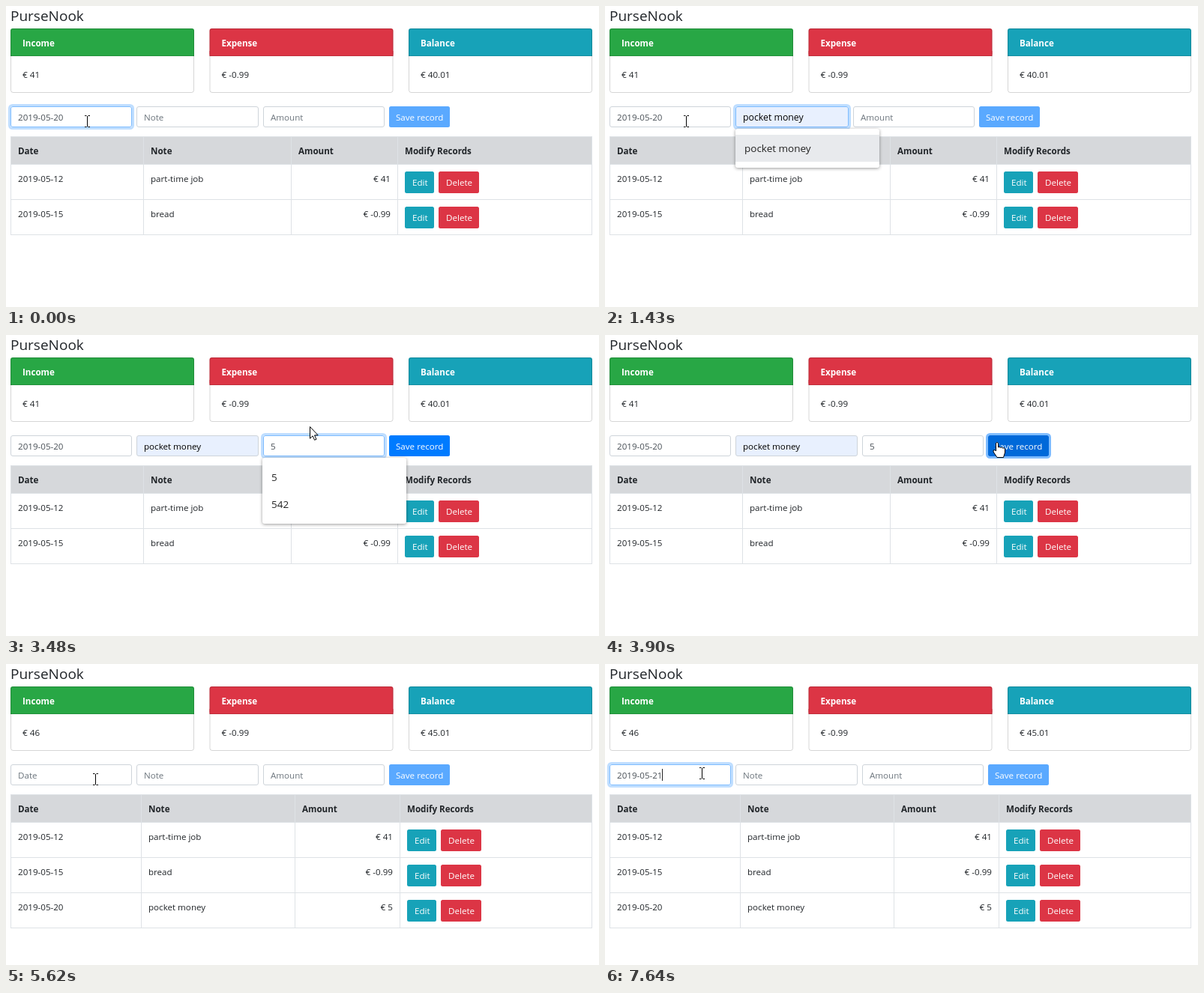
Recreate the animation shown at these times as an HTML page. Size 791 by 402 pixels, loop 8 s.

```html
<!DOCTYPE html>
<html lang="en">
<head>
<meta charset="utf-8">
<title>Budget table</title>
<style>
  html, body { margin: 0; width: 100%; height: 100%; overflow: hidden; background: #fff; }
  svg { display: block; width: 791px; height: 402px; }
  text { font: 11.6px "Open Sans", "Noto Sans", sans-serif; fill: #212529; white-space: pre; }
  .b { font-weight: 700; }
  .w { fill: #fff; }
  .hint { fill: #6c757d; }
  .typed { fill: #495057; }
  .auto { fill: #000; }
  .preview { font-size: 12.3px; fill: #000; }
  .item { font-size: 13.5px; fill: #222; }
  .title { font-size: 19px; font-weight: 500; }
  .end { text-anchor: end; }
  .pop { filter: drop-shadow(0 1px 2px rgba(0, 0, 0, .4)); }
</style>
</head>
<body>
<svg id="stage" viewBox="0 0 791 402"></svg>
<script>
const LOOP = 8000;
const SAVE = 4670;
const BLUE = '#007bff', TEAL = '#17a2b8', RED = '#dc3545', GREEN = '#28a745';
const stage = document.getElementById('stage');
const pen = document.createElement('canvas').getContext('2d');

const clamp = v => Math.max(0, Math.min(1, v));
const ease = v => { v = clamp(v); return v * v * (3 - 2 * v); };
const fade = (t, on, off, ms = 130) => ease((t - on) / ms) - ease((t - off) / ms);
const within = (t, a, b) => t >= a && t < b;
const valueAt = (t, steps) => steps.filter(s => t >= s[0]).pop()[1];

const text = (x, y, s, cls = '') => `<text x="${x}" y="${y}" class="${cls}">${s}</text>`;
const rect = (x, y, w, h, fill, r = 0, extra = '') =>
  `<rect x="${x}" y="${y}" width="${w}" height="${h}" rx="${r}" fill="${fill}" ${extra}/>`;
const line = (x1, y1, x2, y2, color = '#dee2e6') =>
  `<path d="M${x1} ${y1}L${x2} ${y2}" stroke="${color}"/>`;
const ring = (x, w, alpha) => alpha > 0
  ? rect(x - 1.5, 132.5, w + 3, 31, 'none', 4, `stroke="${BLUE}" stroke-width="3" stroke-opacity="${alpha.toFixed(3)}"`) : '';
const mix = (a, b, k) => `rgb(${a.map((v, i) => Math.round(v + (b[i] - v) * k))})`;

function textWidth(s) {
  pen.font = '11.6px "Open Sans", "Noto Sans", sans-serif';
  return pen.measureText(s).width;
}

// Form contents over time
const DATE = [[0, '2019-05-20'], [SAVE, ''], [6710, '2'], [7140, '2019-05'], [7600, '2019-05-2'], [7640, '2019-05-21']];
const NOTE = [[0, ''], [580, 'p'], [1410, 'pocket money'], [SAVE, '']];
const AMOUNT = [[0, ''], [2970, '5'], [SAVE, '']];

// field, on, off
const CARETS = [[1, 110, 1170], [1, 1680, 2150], [2, 2170, 2660], [2, 2970, 3470], [0, 5890, 6390], [0, 6710, LOOP]];

// x, on, off, items
const POPUPS = [
  [174, 600, 1680, ['pocket money']],
  [342, 2970, 3770, ['5', '542']],
  [6, 5910, 6710, ['21-03-2019', '2019-05-05', '2019-04-13', '2019-04-10', '28-02-2019', '01-03-2019']],
  [6, 7140, 7600, ['2019-05-05']]
];

// time, x, y
const PATH = [
  [0, 108, 154], [3210, 108, 154], [3300, 190, 130], [3400, 310, 120], [3480, 404, 122], [3560, 480, 130],
  [3620, 523, 143], [4440, 523, 143], [4540, 485, 126], [SAVE, 485, 126], [5020, 421, 147], [5200, 421, 147],
  [5400, 270, 157], [5620, 119, 154], [5710, 121, 150], [6300, 121, 150], [6460, 129, 146], [LOOP, 129, 146]
];

function card(x, color, name, amount) {
  return rect(x, 30, 245, 37, color, 3) + rect(x, 60, 245, 7, color) +
    line(x, 66.5, x + 245, 66.5, 'rgba(0,0,0,.125)') +
    rect(x + .5, 30.5, 244, 85, 'none', 3, 'stroke="rgba(0,0,0,.16)"') +
    text(x + 16, 54, name, 'b w') + text(x + 16, 96, '€ ' + amount);
}

function table(saved) {
  const rows = [['2019-05-12', 'part-time job', '41'], ['2019-05-15', 'bread', '-0.99']];
  if (saved) rows.push(['2019-05-20', 'pocket money', '5']);
  const cols = saved ? [6, 180, 385, 525] : [6, 183, 380, 522];
  const bottom = 211.5 + rows.length * 47;
  let out = rect(6, 174, 776, 38, '#d6d8db');
  for (let y = 211.5; y <= bottom; y += 47) out += line(6, y, 782, y);
  out += line(6, 174.5, 782, 174.5);
  for (const x of [...cols, 781]) out += line(x + .5, 174, x + .5, bottom + .5);
  ['Date', 'Note', 'Amount', 'Modify Records'].forEach((s, i) => {
    out += text(cols[i] + 10, 198, s, 'b');
  });
  rows.forEach(([date, note, amount], i) => {
    const y = 235 + i * 47, x = cols[3] + 10;
    out += text(16, y, date) + text(cols[1] + 10, y, note) + text(cols[3] - 9, y, '€ ' + amount, 'end') +
      rect(x, y - 14, 39, 29, TEAL, 2.5) + text(x + 10, y + 5, 'Edit', 'w') +
      rect(x + 45, y - 14, 54, 29, RED, 2.5) + text(x + 55, y + 5, 'Delete', 'w');
  });
  return out;
}

function field(x, w, hint, value, focus, cls) {
  const auto = cls !== 'typed' && value;
  return ring(x, w, focus * .25) +
    rect(x + .5, 134.5, w - 1, 27, auto ? '#e8f0fe' : '#fff', 2.5,
      `stroke="${mix([206, 212, 218], [128, 189, 255], focus)}"`) +
    text(x + 10, 153, value || hint, value ? cls : 'hint');
}

function form(t) {
  const preview = within(t, 1410, 1680);
  const shift = preview ? -12 : 0;
  const noteWidth = preview ? 151 : 163;
  const noteClass = preview ? 'preview' : t >= 1680 ? 'auto' : 'typed';
  const values = [DATE, NOTE, AMOUNT].map(s => valueAt(t, s));
  const ready = within(t, 2970, SAVE);
  const hover = fade(t, 3770, 4460);
  const bx = 511 + shift;
  let out =
    field(6, 162, 'Date', values[0], 1 - ease((t - 100) / 110) + ease((t - 5880) / 130), 'typed') +
    field(174, noteWidth, 'Note', values[1], fade(t, 100, 2150), noteClass) +
    field(343 + shift, 162, 'Amount', values[2], fade(t, 2150, 3770), 'typed') +
    (ready ? ring(bx, 81, fade(t, 3770, LOOP) * .5) : '') +
    rect(bx, 134, 81, 28, ready ? mix([0, 123, 255], [0, 105, 217], hover) : '#5aa9ff', 2.5) +
    text(bx + 9, 153, 'Save record', 'w');
  const caret = CARETS.find(c => within(t, c[1], c[2]));
  if (caret && !preview) {
    const x = Math.floor([16, 184, 353][caret[0]] + textWidth(values[caret[0]])) + .5;
    out += line(x, 140, x, 156, '#222');
  }
  return out;
}

function popup(t, [x, on, off, items]) {
  if (!within(t, on, off)) return '';
  const marked = within(t, 1410, 1680);
  return `<g class="pop" opacity="${clamp((t - on + 25) / 80).toFixed(2)}">` +
    rect(x, 164, 192, 16 + items.length * 36, '#fff', 3) +
    (marked ? rect(x, 172, 192, 36, '#e8eaed') : '') +
    items.map((s, i) => text(x + 12, 195 + i * 36, s, 'item')).join('') + '</g>';
}

const SHAPES = {
  beam: '<path d="M-3 -7.5H-.5M1.5 -7.5H4M.5 -7V7M-3 7.5H-.5M1.5 7.5H4" stroke="#000" fill="none"/>',
  arrow: '<path d="M.5 .5V16.2L4.1 12.8L6.6 18.3L9 17.2L6.5 11.9H11.2Z" stroke="#000" fill="#fff"/>',
  hand: '<path d="M-1.5 12V1.5Q0 -.8 1.5 1.5V7Q3 5.5 4.5 7.5Q6 6 7.5 8Q9.5 7 10.5 9V14L8.5 20.5H0L-5 13Q-5.5 10 -3 10.5Z" stroke="#000" fill="#fff"/>'
};

function pointer(t) {
  const i = PATH.findIndex(p => p[0] > t);
  const [a, b] = [PATH[i - 1], PATH[i]];
  const k = (t - a[0]) / (b[0] - a[0]);
  const x = Math.round(a[1] + (b[1] - a[1]) * k), y = Math.round(a[2] + (b[2] - a[2]) * k);
  const inRow = within(y, 134, 162);
  const overField = inRow && [[6, 168], [174, 337], [343, 505]].some(f => within(x, f[0], f[1]));
  const overButton = inRow && within(x, 511, 592) && t >= 3770;
  const shape = overField ? 'beam' : overButton ? 'hand' : 'arrow';
  return `<g transform="translate(${x} ${y})">${SHAPES[shape]}</g>`;
}

let last = '';
function render() {
  const t = performance.now() % LOOP;
  const saved = t >= SAVE;
  const html = text(6, 19.5, 'PurseNook', 'title') +
    card(6, GREEN, 'Income', saved ? '46' : '41') +
    card(271.5, RED, 'Expense', '-0.99') +
    card(537, TEAL, 'Balance', saved ? '45.01' : '40.01') +
    table(saved) + form(t) + POPUPS.map(p => popup(t, p)).join('') + pointer(t);
  if (html !== last) stage.innerHTML = last = html;
  requestAnimationFrame(render);
}
render();
</script>
</body>
</html>
```
